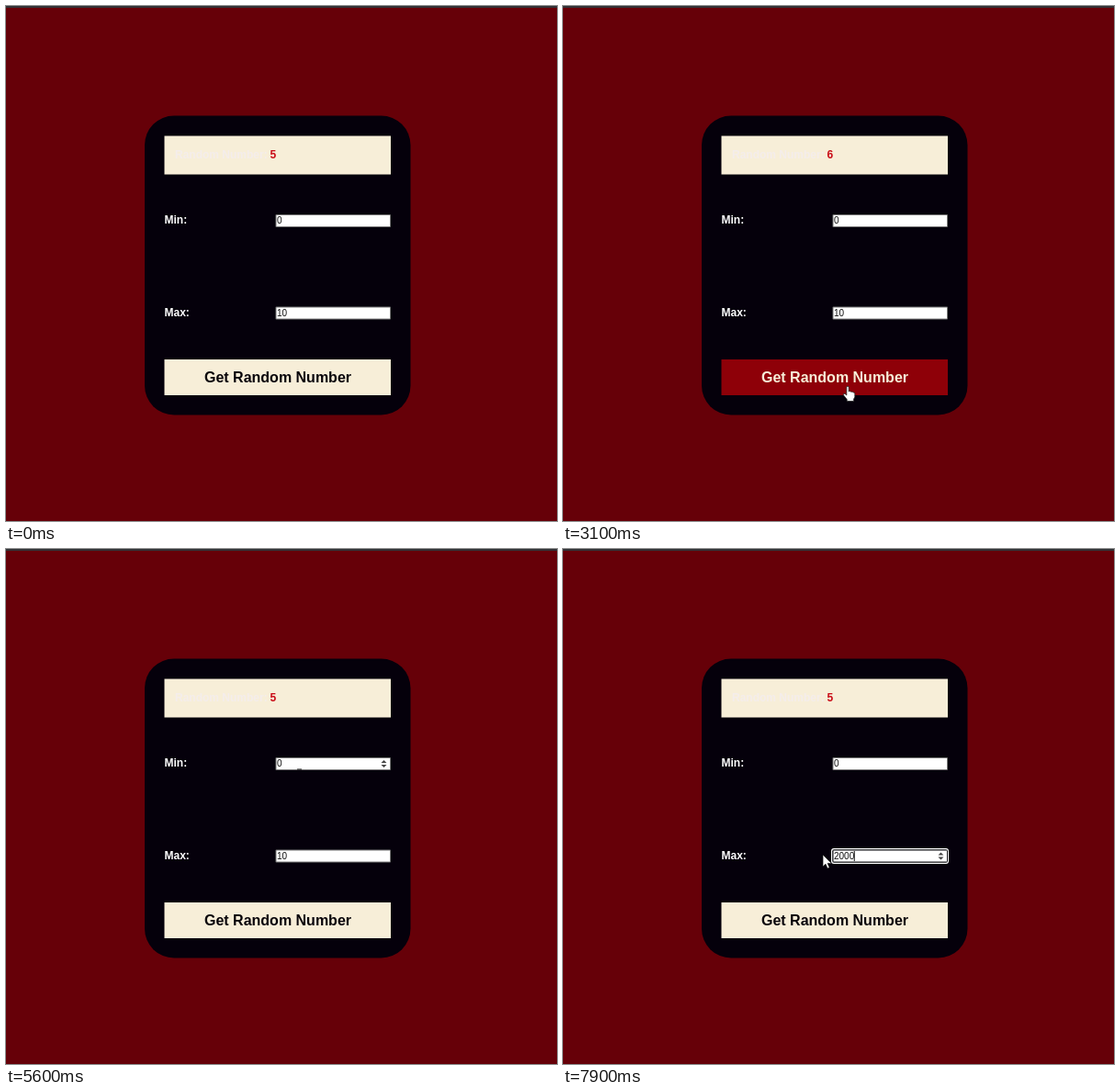
Recreate the animation shown at these times as an HTML page. Size 600 by 561 pixels, loop 8000 ms.

```html
<!DOCTYPE html>
<html lang="en">
<head>
<meta charset="utf-8">
<title>Random number</title>
<style>
  html, body { margin: 0; width: 100%; height: 100%; overflow: hidden; background: #660008; }
  svg { display: block; }
  text { font-family: "Liberation Sans", Arial, sans-serif; white-space: pre; }
  .bold { font-weight: bold; font-size: 12px; }
  .value { font-size: 10px; }
</style>
</head>
<body>
<svg width="600" height="561" viewBox="0 0 600 561">
  <rect width="600" height="561" fill="#660008"/>
  <rect width="600" height="2" fill="#333236"/>
  <rect x="151" y="119.5" width="289.5" height="326" rx="32" fill="#05000b"/>

  <rect x="172.5" y="141.5" width="246.5" height="42" fill="#f7eed8"/>
  <text class="bold" x="288" y="166" text-anchor="end" fill="#f4edeb">Random Number: </text>
  <text class="bold" id="result" x="287.5" y="166" fill="#c90c17"></text>

  <text class="bold" x="172.5" y="237" fill="#fff">Min:</text>
  <text class="bold" x="172.5" y="338" fill="#fff">Max:</text>

  <g transform="translate(293.5 227)">
    <rect width="125.5" height="14" rx="1" fill="#777"/>
    <rect x="1" y="1" width="123.5" height="12" fill="#fff"/>
    <text class="value" x="1.5" y="10.4" fill="#111">0</text>
    <path id="minSpin" d="M115 6l3-3 3 3zM115 8l3 3 3-3z" fill="#444"/>
  </g>

  <g transform="translate(293.5 327.5)">
    <g id="focus">
      <rect x="-1.5" y="-1.5" width="128" height="17" rx="3" fill="#fff"/>
      <rect x="-.3" y="-.3" width="125.8" height="14.6" rx="2" fill="#101014"/>
    </g>
    <rect id="maxBorder" width="125.5" height="14" rx="1" fill="#777"/>
    <rect x="1" y="1" width="123.5" height="12" fill="#fff"/>
    <rect id="selection" x="1.5" y="1.5" height="11" fill="#3a62a8"/>
    <text class="value" id="maxValue" x="1.5" y="10.4"></text>
    <rect id="caret" y="1.5" width="1" height="11" fill="#111"/>
    <path id="maxSpin" d="M115 6l3-3 3 3zM115 8l3 3 3-3z" fill="#444"/>
  </g>

  <rect id="button" x="172.5" y="385" width="246.5" height="39"/>
  <text id="buttonText" x="296" y="409.5" text-anchor="middle" font-size="16" font-weight="bold">Get Random Number</text>

  <g id="cursor">
    <path id="arrow" d="M0 0V13L3 10.2 5 15 7.2 14 5.2 9.4H9.4Z" fill="#fff" stroke="#111" stroke-width=".7"/>
    <path id="hand" d="M-1.2 1Q0-.8 1.2 1V6Q2.6 4.8 3.6 6.4 5 5.4 5.8 7 7.6 6.4 7.8 8.4V11.5Q7.6 13 6.6 14V16.5H-.8V14.6L-4.6 9.8Q-5 7.6-3 8.4L-1.2 10Z" fill="#fff" stroke="#222" stroke-width=".8"/>
    <path id="beam" d="M-2 6h5" stroke="#111"/>
  </g>
</svg>

<script>
const LOOP = 8000;
const $ = id => document.getElementById(id);
const show = (id, visible) => $(id).setAttribute("display", visible ? "inline" : "none");
const clamp = v => Math.min(1, Math.max(0, v));

// Pointer path: time, x, y
const path = [
  [1800, 441, 430], [2000, 360, 429], [2100, 305, 423], [2200, 283, 414],
  [2600, 310, 414], [4300, 310, 414], [4700, 324, 411], [5120, 324, 411],
  [5200, 323, 380], [5500, 319, 234], [5750, 319, 234], [5980, 309, 334],
  [6220, 283, 333], [LOOP, 283, 333]
];
const results = [[0, "5"], [2600, "6"], [3800, "5"]];
const typed = [[0, "10"], [6800, "2"], [7000, "20"], [7200, "200"], [7400, "2000"]];

const latest = (steps, t) => steps.filter(step => step[0] <= t).pop()[1];

function pointerAt(t) {
  const i = Math.max(1, path.findIndex(p => p[0] > t));
  const [a, b] = [path[i - 1], path[i]];
  const k = clamp((t - a[0]) / (b[0] - a[0]));
  const s = k * k * (3 - 2 * k);
  return [a[1] + (b[1] - a[1]) * s, a[2] + (b[2] - a[2]) * s];
}

const ease = p => 1 - (1 - clamp(p)) ** 2;
const hoverAt = t => ease((t - 2090) / 300) - ease((t - 5180) / 300);
const mix = (a, b, k) => `rgb(${a.map((v, i) => Math.round(v + (b[i] - v) * k))})`;

function draw(t) {
  const [x, y] = pointerAt(t);
  const over = (left, top, right, bottom) => x >= left && x <= right && y >= top && y <= bottom;
  const onButton = over(172, 385, 419, 424);
  const onMin = over(293, 227, 419, 241);
  const onMax = over(293, 327, 419, 342);

  show("cursor", t >= 1800);
  $("cursor").setAttribute("transform", `translate(${x} ${y})`);
  show("hand", onButton);
  show("beam", onMin || onMax);
  show("arrow", !onButton && !onMin && !onMax);

  const hover = hoverAt(t);
  $("button").setAttribute("fill", mix([247, 238, 216], [142, 0, 8], hover));
  $("buttonText").setAttribute("fill", mix([8, 4, 10], [247, 238, 216], hover));
  $("result").textContent = latest(results, t);

  const focused = t >= 5980;
  const selecting = focused && t < 6800;
  const value = latest(typed, t);
  show("minSpin", onMin);
  show("maxSpin", focused || onMax);
  show("focus", focused);
  show("maxBorder", !focused);
  show("selection", selecting);
  $("selection").setAttribute("width", 11.2 * clamp((t - 5980) / 150));
  $("maxValue").textContent = value;
  $("maxValue").setAttribute("fill", selecting ? "#fff" : "#111");
  show("caret", t >= 6800);
  $("caret").setAttribute("x", 1 + value.length * 5.56);
}

const start = performance.now();
function tick() {
  draw((performance.now() - start) % LOOP);
  requestAnimationFrame(tick);
}
tick();
</script>
</body>
</html>
```
